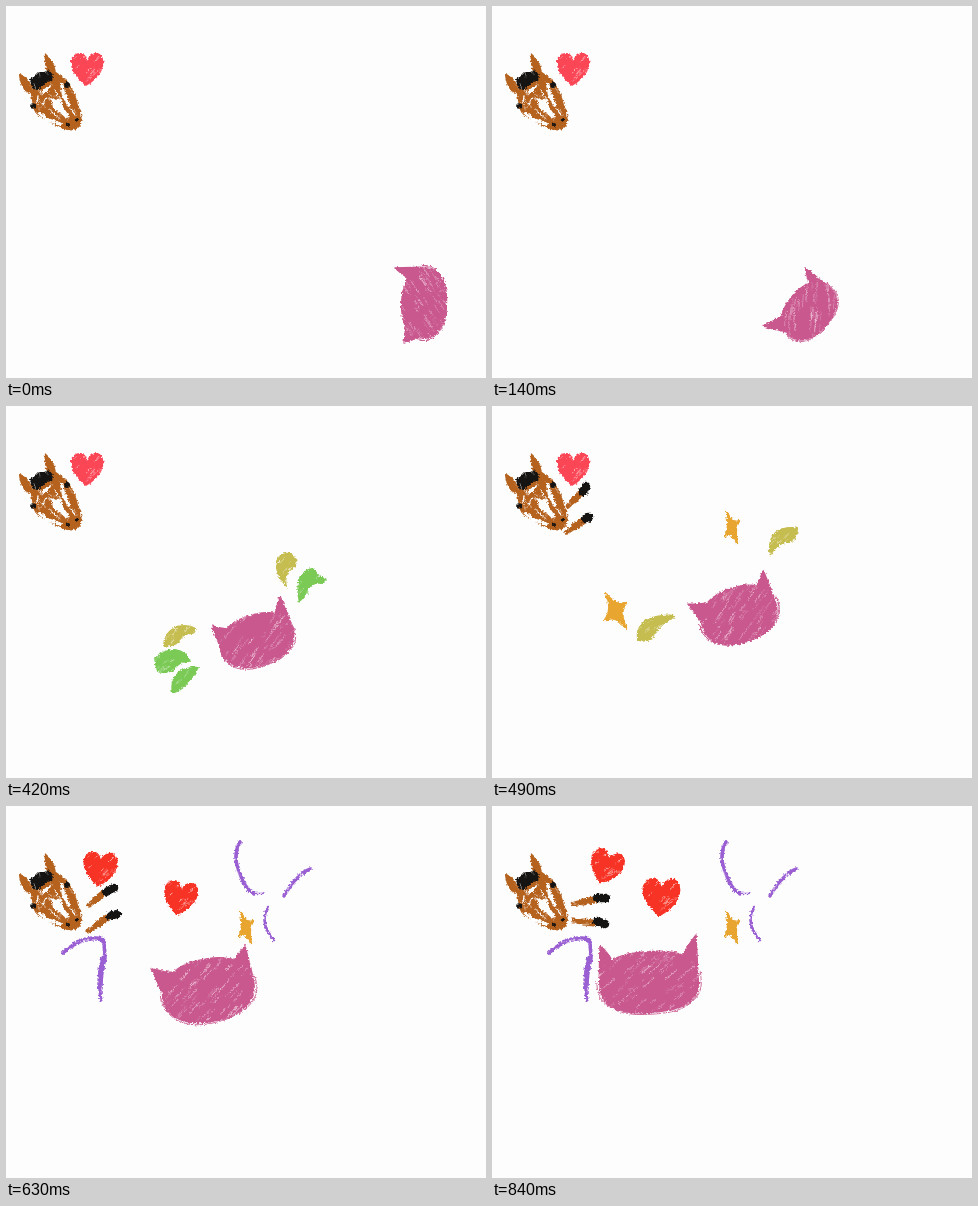
Recreate the animation shown at these times as an HTML page with a canvas. Size 480 by 372 pixels, loop 1540 ms.

```html
<!DOCTYPE html>
<html lang="en">
<head>
<meta charset="utf-8">
<title>Crayon horse and hearts</title>
<style>
html, body { margin: 0; width: 100%; height: 100%; overflow: hidden; background: #fdfdfd; }
canvas { display: block; filter: url(#rough); }
svg { position: absolute; width: 0; height: 0; }
</style>
</head>
<body>
<svg><filter id="rough" x="0" y="0" width="1" height="1" color-interpolation-filters="sRGB">
  <feTurbulence type="fractalNoise" baseFrequency=".45" numOctaves="2" seed="4" result="n"/>
  <feDisplacementMap in="SourceGraphic" in2="n" scale="4" xChannelSelector="R" yChannelSelector="G"/>
</filter></svg>
<canvas id="stage" width="480" height="372"></canvas>
<script>
const ctx = document.getElementById('stage').getContext('2d');
const PAPER = '#fdfdfd', PINK = '#c9588f', BROWN = '#b5621f', BLACK = '#161412';
const PURPLE = '#9a5fd2', GREEN = '#7bca56', OLIVE = '#c6bd50', ORANGE = '#e8a52f';
const STEP = 70, LAST = 12, LOOP = 1540, RAD = Math.PI / 180;

// centre x, y, radii, tilt, left ear tip, right ear tip; one pose per two steps
const poses = [
  [418, 297, 36, 23, -87, 398, 337, 389, 262],
  [317, 305, 32, 23, -50, 271, 320, 313, 262],
  [270, 271, 33, 26, -38, 225, 261, 286, 229],
  [251, 234, 38, 26, -18, 206, 220, 274, 190],
  [237, 188, 41, 31, -20, 180, 178, 264, 144],
  [168, 185, 52, 32, -3, 113, 151, 214, 140],
  [157, 176, 50, 31, -4, 108, 139, 204, 129]
];

let seed = 1;
function rnd() {
  seed = (seed * 16807) % 2147483647;
  return seed / 2147483647;
}

function line(d, color, width) {
  ctx.strokeStyle = color;
  ctx.lineWidth = width;
  ctx.lineCap = ctx.lineJoin = 'round';
  ctx.stroke(new Path2D(d));
}

// wax gaps: short pale strokes scattered over a box
function streaks(x, y, w, h, angle, count, len, color = PAPER) {
  ctx.strokeStyle = color;
  const dx = Math.cos(angle * RAD), dy = Math.sin(angle * RAD);
  for (let i = 0; i < count; i++) {
    const px = x + rnd() * w, py = y + rnd() * h, l = len * (.3 + rnd() * .7);
    ctx.globalAlpha = .25 + rnd() * .5;
    ctx.lineWidth = .5 + rnd() * .6;
    ctx.beginPath();
    ctx.moveTo(px - dx * l / 2, py - dy * l / 2);
    ctx.lineTo(px + dx * l / 2, py + dy * l / 2);
    ctx.stroke();
  }
  ctx.globalAlpha = 1;
}

function crayon(d, color, box, angle = -50, count = 12, len = 8) {
  const path = d instanceof Path2D ? d : new Path2D(d);
  ctx.save();
  ctx.fillStyle = color;
  ctx.fill(path);
  ctx.clip(path);
  if (box) streaks(...box, angle, count, len);
  ctx.restore();
}

function dot(x, y, r, color = BLACK) {
  ctx.fillStyle = color;
  ctx.beginPath();
  ctx.arc(x, y, r, 0, 7);
  ctx.fill();
}

function poseAt(step) {
  const i = step >> 1;
  if (step % 2 === 0) return poses[i];
  const at = k => poses[Math.max(0, Math.min(6, k))];
  return poses[i].map((v, k) => (9 * (v + at(i + 1)[k]) - at(i - 1)[k] - at(i + 2)[k]) / 16);
}

function head(step) {
  const [cx, cy, rx, ry, tilt, lx, ly, tx, ty] = poseAt(step);
  const c = Math.cos(tilt * RAD), s = Math.sin(tilt * RAD);
  const squash = step > 9 ? .78 : .9;
  const rim = (deg, k = 1) => {
    const a = Math.cos(deg * RAD), b = Math.sin(deg * RAD);
    const x = rx * k * Math.sign(a) * Math.abs(a) ** squash;
    const y = ry * k * Math.sign(b) * Math.abs(b) ** squash;
    return [cx + x * c - y * s, cy + x * s + y * c];
  };
  const body = new Path2D();
  for (let a = 0; a < 360; a += 6) body.lineTo(...rim(a));
  body.closePath();
  const ear = (x, y, inner, outer) => {
    const p = rim(inner), q = rim(outer), e = new Path2D();
    const bend = (m, t) => (m * 2 + t * 2 + (m === p[0] || m === q[0] ? cx : cy) * .35) / 4.35;
    e.moveTo(...p);
    e.quadraticCurveTo(bend(p[0], x), bend(p[1], y), x, y);
    e.quadraticCurveTo((q[0] + x) / 2, (q[1] + y) / 2, ...q);
    e.lineTo(...rim((inner + outer) / 2, .75));
    e.closePath();
    ctx.fillStyle = ctx.strokeStyle = PINK;
    ctx.lineWidth = 1.5;
    ctx.lineJoin = 'round';
    ctx.fill(e);
    ctx.stroke(e);
  };
  seed = 71 + step * 37;
  ear(lx, ly, 229, 192);
  ear(tx, ty, -49, -10);
  crayon(body, PINK);
  ctx.save();
  ctx.clip(body);
  const r = Math.max(rx, ry);
  streaks(cx - r, cy - r, 2 * r, 2 * r, tilt - 36, r * 2.1, 15, '#f3d3e2');
  ctx.restore();
  // loose scribbled contour
  ctx.strokeStyle = PINK;
  ctx.lineWidth = .9;
  for (let n = 0; n < 2; n++) {
    const f = rnd() * 6;
    ctx.beginPath();
    for (let a = -8; a < 190; a += 6) ctx.lineTo(...rim(a, 1.01 + .035 * Math.sin(a / 30 + f)));
    ctx.stroke();
  }
}

function horse() {
  seed = 9;
  crayon('M39 47Q48 54 50 66L60 73Q70 87 72 99Q77 108 75 119Q70 126 62 124Q52 122 40 114Q29 110 27 101L25 88L19 85Q13 77 13 67Q21 71 26 79L42 68Q37 57 39 47Z',
    BROWN, [25, 72, 46, 48], 55, 42, 8);
  ctx.fillStyle = PAPER;
  ctx.fill(new Path2D('M45 91L50 94L54 91L57 101L64 111L60 112L52 105L47 102ZM35 85L46 78L43 84L36 89ZM54 78L57 76L59 87L65 100L62 101L56 90ZM30 106L36 107L42 112L56 117L55 120L40 115Z'));
  line('M49 84L52 90M40 92L37 98M44 104L50 110M65 103L69 109M32 91L31 96', PAPER, 1.4);
  crayon('M24 73L29 70L33 66L38 66L43 64L47 69L46 75L40 76L36 81L30 84L26 82Z', BLACK, [25, 66, 20, 16], 70, 5, 6);
  dot(27, 100, 2.8);
  dot(61, 79, 3);
  dot(62, 119, 2.1);
  dot(70.5, 114, 1.7);
}

function leg(x1, y1, x2, y2, hx, hy) {
  line(`M${x1} ${y1}L${x2} ${y2}`, BROWN, 5);
  line(`M${(x1 + x2) / 2} ${(y1 + y2) / 2}L${x2} ${y2}`, BROWN, 7);
  line(`M${x2 + 3} ${y2 - 2}L${hx} ${hy}`, BLACK, 8.5);
  seed = 17;
  streaks(Math.min(x1, x2), Math.min(y1, y2), Math.abs(x2 - x1), Math.abs(y2 - y1) + 2,
    Math.atan2(y2 - y1, x2 - x1) / RAD, 5, 7);
}

function legs(step) {
  if (step === 7) {
    leg(76, 100, 88, 88, 94, 80);
    leg(75, 126, 91, 115, 97, 111);
  } else if (step === 8) {
    leg(82, 95, 95, 83, 104, 75);
    leg(79, 125, 98, 112, 108, 107);
  } else if (step === 9) {
    leg(83, 99, 97, 88, 108, 82);
    leg(82, 125, 101, 112, 111, 108);
  } else if (step === 10) {
    leg(85, 103, 101, 92, 113, 88);
    leg(84, 124, 104, 113, 113, 108);
  } else if (step === 11) {
    leg(83, 101, 102, 93, 114, 90);
    leg(83, 119, 103, 115, 114, 113);
  } else if (step === 12) {
    leg(81, 98, 102, 94, 114, 92);
    leg(81, 115, 102, 117, 113, 118);
  }
}

function heart(x, y, size, tilt, color) {
  ctx.save();
  ctx.translate(x, y);
  ctx.rotate(tilt * RAD);
  ctx.scale(size, size);
  seed = 23;
  crayon('M-1 17Q-18 3 -16 -9Q-13 -17 -6 -16Q-1 -15 0 -9Q4 -17 11 -16Q18 -13 16 -2Q13 9 -1 17Z',
    color, [-15, -15, 30, 30], -50, 16, 9);
  ctx.restore();
}

function hearts(step) {
  if (step < 9) return heart(81, 63, 1, 0, '#fb4656');
  const red = '#f73325';
  const [a, b] = {
    9: [[94, 63, 1.05, 4], [174, 92, 1.04, 9]],
    10: [[105, 63, 1.1, 9], [172, 91, 1.1, 7]],
    11: [[109, 62, 1.07, 13], [171, 91, 1.13, 5]],
    12: [[114, 61, 1.04, 17], [169, 91, 1.16, 2]]
  }[step];
  heart(...a, red);
  heart(...b, red);
}

function leaves() {
  seed = 41;
  crayon('M281 182Q268 169 270 155Q274 145 284 147Q293 151 290 160L283 166Q279 172 281 182Z', OLIVE, [270, 147, 20, 30]);
  crayon('M293 197Q289 181 294 170Q301 161 308 162L312 168L321 173L316 178Q303 176 302 187Z', GREEN, [291, 163, 28, 32], -50, 16);
  crayon('M157 240Q158 225 171 220Q182 217 190 222L189 228Q176 227 173 237Q164 242 157 240Z', OLIVE, [157, 219, 30, 22]);
  crayon('M148 253Q154 244 169 243Q182 245 185 256Q173 255 169 264Q161 269 151 266Z', GREEN, [149, 244, 34, 22], -30, 16);
  crayon('M166 288Q163 273 173 265Q183 260 193 261Q188 272 183 275Q179 284 166 288Z', GREEN, [165, 261, 28, 26], -40, 14);
}

function drops() {
  seed = 53;
  crayon('M278 151Q274 136 283 126Q294 119 306 122Q306 131 300 136Q286 136 278 151Z', OLIVE, [278, 121, 27, 28], -45, 15);
  crayon('M183 209Q166 207 152 215Q143 222 145 234Q151 238 160 233Q170 216 183 212Z', OLIVE, [146, 209, 34, 25], -35, 15);
}

function star(x, y, tips) {
  let d = '';
  tips.forEach(([a, b], i) => {
    const [p, q] = tips[(i + 1) % 4];
    d += `${i ? 'L' : 'M'}${x + a} ${y + b}Q${x + (a + p) * .14} ${y + (b + q) * .14} ${x + p} ${y + q}`;
  });
  crayon(d + 'Z', ORANGE);
  line(d + 'Z', ORANGE, 2.4);
}

const rightStar = () => star(240, 121, [[-5, -14], [7, -6], [5, 16], [-7, 9]]);
const leftStar = () => star(124, 204, [[-10, -16], [10, -7], [10, 18], [-11, 10]]);

function sprouts() {
  line('M129 178Q149 179 160 190', PURPLE, 3.5);
  line('M147 183Q158 187 167 197', PURPLE, 5);
  line('M169 140Q161 152 166 172Q169 188 173 201', PURPLE, 4.8);
  line('M183 161Q171 162 170 180L173 200', PURPLE, 2.8);
  line('M258 92Q266 81 276 85Q286 92 285 107Q284 117 278 122', PURPLE, 4.6);
  line('M303 68Q289 70 282 87', PURPLE, 3);
  line('M268 103Q258 106 258 117Q260 130 270 131', PURPLE, 1.3);
}

function ribbons() {
  line('M234 36Q226 50 234 68Q239 83 248 88', PURPLE, 3.6);
  line('M241 84Q248 89 258 87', PURPLE, 1.4);
  line('M304 63Q291 68 278 90', PURPLE, 3.4);
  line('M262 101Q255 114 262 126L268 134', PURPLE, 2.6);
  line('M57 147Q67 137 80 134Q91 131 98 135', PURPLE, 3.8);
  line('M68 137Q82 130 96 132Q100 138 99 148', PURPLE, 2.6);
  line('M98 140Q100 154 95 169Q93 180 95 195', PURPLE, 3.2);
  line('M98 152Q94 164 94 182', PURPLE, 5.6);
  seed = 61;
  streaks(230, 38, 8, 45, 70, 7, 8);
  streaks(280, 66, 20, 22, -45, 6, 7);
  streaks(64, 131, 30, 6, -18, 6, 8);
}

function draw(step) {
  ctx.clearRect(0, 0, 480, 372);
  horse();
  hearts(step);
  if (step === 6) leaves();
  if (step === 7 || step === 8) {
    drops();
    leftStar();
  }
  if (step >= 7) rightStar();
  if (step === 8) sprouts();
  if (step >= 9) ribbons();
  legs(step);
  head(step);
}

let shown = -1;
const start = performance.now();
function tick() {
  const t = (performance.now() - start) % LOOP;
  const step = Math.min(LAST, Math.floor(t / STEP));
  if (step !== shown) draw(shown = step);
  requestAnimationFrame(tick);
}
tick();
</script>
</body>
</html>
```
